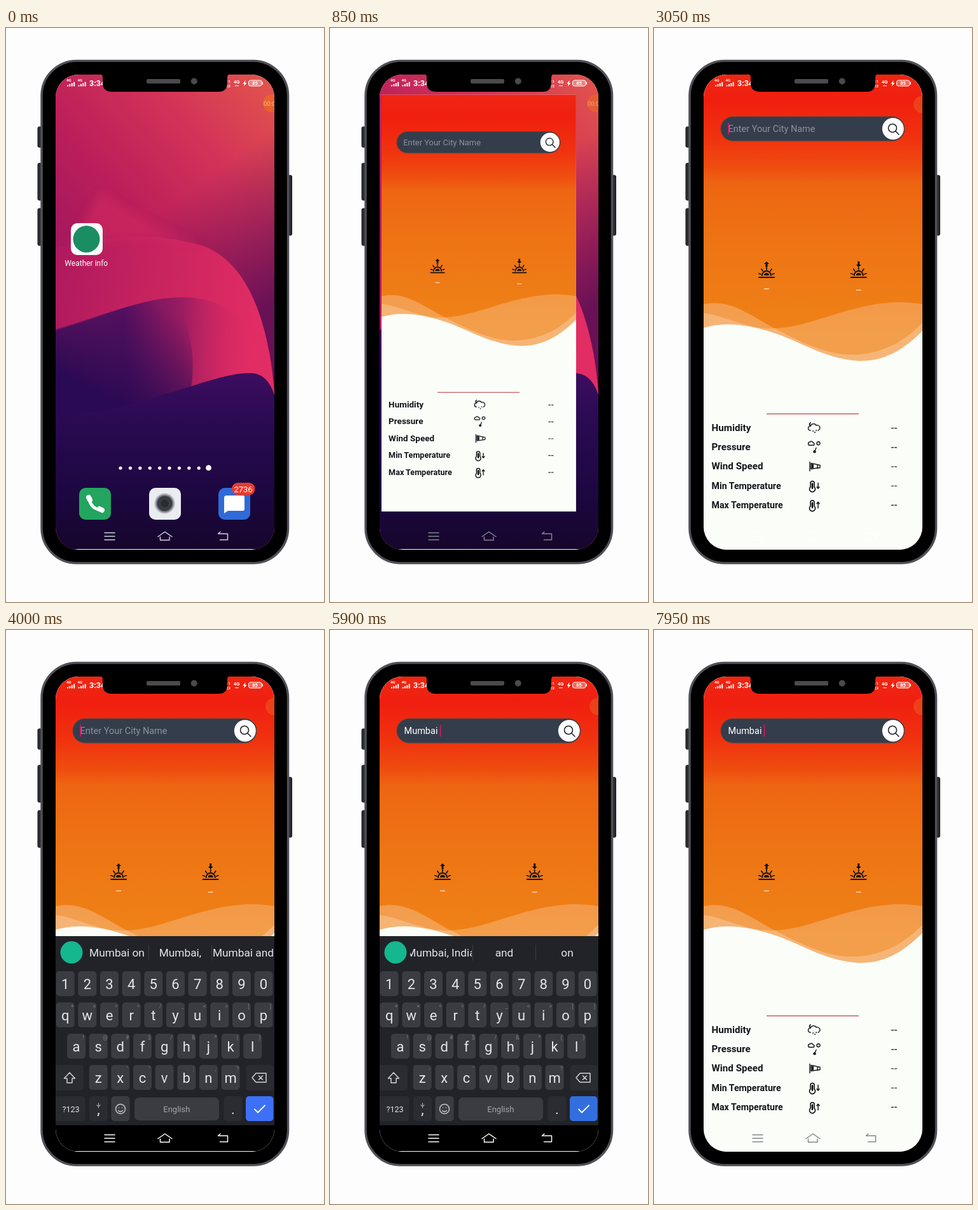
Write an HTML page that moves like this. It is 500 px wide and 900 px high and loops after 8 s.

```html
<!DOCTYPE html>
<html lang="en">
<head>
<meta charset="utf-8">
<title>Weather app demo</title>
<style>
  html, body { margin: 0; width: 100%; height: 100%; overflow: hidden; background: #fdfdfd; }
  svg { display: block; width: 500px; height: 900px; font-family: Roboto, sans-serif; }
  .mid { text-anchor: middle; }
  .line { fill: none; stroke: currentColor; stroke-linecap: round; stroke-linejoin: round; }
</style>
</head>
<body>
<svg viewBox="0 0 500 900">
  <defs>
    <clipPath id="screen"><rect x="78" y="73" width="344" height="745" rx="36"/></clipPath>
    <clipPath id="firstWord"><rect x="126" y="485" width="97" height="40"/></clipPath>
    <filter id="soft"><feGaussianBlur stdDeviation="7"/></filter>
    <g id="sunIcon">
      <path d="M-12 12H12M-7 9a7 7 0 0 1 14 0" class="line" stroke-width="2"/>
      <path d="M-12 6l3 1M12 6l-3 1M-8 -1l2 3M8 -1l-2 3M0 -3v3" class="line" stroke-width="1.8"/>
      <path d="M-4 9a4 4 0 0 1 8 0z"/>
    </g>
    <g id="thermo" class="line" stroke-width="1.5">
      <path d="M-6 -4a3 3 0 0 1 6 0v6a4.5 4.5 0 1 1 -6 0z"/>
      <path d="M-3 -3v7" stroke-width="2.6"/>
    </g>
  </defs>

  <g fill="#2b2c2f" stroke="#17181a" stroke-width="1">
    <rect x="50" y="155" width="8" height="32" rx="2"/>
    <rect x="50" y="212" width="8" height="58" rx="2"/>
    <rect x="50" y="283" width="8" height="58" rx="2"/>
    <rect x="441" y="231" width="8.5" height="94" rx="2"/>
  </g>
  <rect x="56" y="51.5" width="387.5" height="787.5" rx="55" fill="#000" stroke="#505156" stroke-width="3.5"/>

  <g clip-path="url(#screen)">
    <rect x="78" y="73" width="344" height="745" fill="#fbfdf9"/>
    <g id="wallpaper"></g>
    <g id="home"></g>
    <g id="app"></g>
    <g id="recorder">
      <circle cx="418" cy="118" r="14" fill="#e8622d"/>
      <text x="405" y="122" font-size="9.5" fill="#f6bd9d">00:0</text>
    </g>
    <g id="faintRecorder">
      <circle cx="421.500" cy="120" r="13.500" fill="#ee5a20" opacity=".55"/>
      <path d="M415 120h7" stroke="#d9441c" stroke-width="2"/>
    </g>
    <g id="keyboard"></g>
    <g id="nav" class="line" stroke-width="1.5">
      <path d="M155 791.500h16M155 797h16M155 802.500h16"/>
      <path d="M239 797.500L249.800 790L261 797.500M242.500 798v5H257v-5"/>
      <path d="M337 790l-3.500 3h15v9.500h-12"/>
    </g>
    <g id="status" fill="#fff"></g>
  </g>

  <path d="M150 70H350V73Q348 74 348 78V86Q348 100 334 100H167Q152 100 152 86V78Q152 74 150 73z"/>
  <rect x="221" y="80" width="53" height="7" rx="2" fill="#4b4b4e"/>
  <circle cx="295.700" cy="83.500" r="5" fill="#4b4b4e"/>
</svg>

<script>
const $ = id => document.getElementById(id);
const fill = (id, ...parts) => { $(id).innerHTML = parts.flat().join(''); };
const text = (x, y, size, str, color = '#fff', more = '') =>
  `<text x="${x}" y="${y}" font-size="${size}" fill="${color}" ${more}>${str}</text>`;
const mid = (x, y, size, str, color, more = '') => text(x, y, size, str, color, `class="mid" ${more}`);
const box = (x, y, w, h, r, color, more = '') =>
  `<rect x="${x}" y="${y}" width="${w}" height="${h}" rx="${r}" fill="${color}" ${more}/>`;
const shape = (d, color, more = '') => `<path d="${d}" fill="${color}" ${more}/>`;
const dot = (x, y, r, color, more = '') => `<circle cx="${x}" cy="${y}" r="${r}" fill="${color}" ${more}/>`;
const line = (d, color, width) => `<path d="${d}" class="line" color="${color}" stroke-width="${width}"/>`;
const gradient = (id, x1, y1, x2, y2, ...stops) =>
  `<linearGradient id="${id}" gradientUnits="userSpaceOnUse" x1="${x1}" y1="${y1}" x2="${x2}" y2="${y2}">` +
  stops.map(([at, color, alpha = 1]) => `<stop offset="${at}" stop-color="${color}" stop-opacity="${alpha}"/>`).join('') +
  '</linearGradient>';

fill('wallpaper',
  gradient('sky', 420, 90, 120, 350, [0, '#e2534c'], [.35, '#d23458'], [.72, '#bd1f5a'], [1, '#a8195d']),
  gradient('shade', 280, 260, 410, 440, [0, '#6a1058', 0], [1, '#5e0f55', .9]),
  gradient('fold', 78, 400, 400, 440, [0, '#b01a5e'], [.5, '#c9245f'], [1, '#e22c64']),
  gradient('valley', 78, 0, 385, 0, [0, '#7c1766'], [.35, '#5c1162'], [.65, '#951b61', .9], [1, '#e22c64', 0]),
  gradient('dusk', 270, 450, 190, 600, [0, '#2a0a52', 0], [1, '#2a0a52']),
  gradient('hill', 0, 540, 0, 818, [0, '#3d0d60'], [.3, '#290a50'], [.7, '#1c0740'], [1, '#16062c']),
  box(78, 73, 344, 744, 0, 'url(#sky)'),
  box(78, 73, 344, 744, 0, 'url(#shade)'),
  shape('M78 345C140 335 200 312 305 340C370 360 412 440 422 572V620H78z', 'url(#fold)'),
  shape('M150 255C210 305 260 320 310 342C250 325 190 330 100 340z', '#d42a60', 'opacity=".55" filter="url(#soft)"'),
  shape('M78 472C150 452 200 430 250 424C330 415 385 440 422 560V640H78z', 'url(#valley)'),
  shape('M78 474C150 453 200 431 250 424C290 440 300 520 290 570V640H78z', 'url(#dusk)'),
  shape('M78 610C150 602 200 592 240 577C300 560 350 540 385 541C405 542 415 555 422 575V817H78z', 'url(#hill)'));

fill('home',
  box(102, 306, 50, 50, 10, '#fafafa'), dot(126.5, 331, 21, '#1b8d63'),
  mid(126.3, 372.5, 12, 'Weather info'),
  Array.from({ length: 9 }, (_, i) => dot(180 + i * 15.4, 690, 2.6, '#fff')), dot(318.5, 689.7, 4.4, '#fff'),
  box(115, 721, 50, 50, 10, '#23a55f'),
  line('M131 738Q133 753 149 756', '#fff', 5), line('M130 736l2 4M147 754l4 2', '#fff', 8),
  box(225, 721, 50, 50, 10, '#e9edf2'), dot(249.5, 745.5, 16, '#b8bcc2'),
  dot(249.5, 745.5, 14, '#7c8087'), dot(249.5, 745.5, 12, '#3a3d42'), dot(249.5, 745.5, 6, '#2a2c30'),
  box(334, 721, 50, 50, 10, '#2f6bd8'),
  shape('M347 733H372Q375 733 375 736V754Q375 757 372 757H349L343 761V737Q343 733 347 733z', '#fff'),
  box(355, 713, 36.5, 19.5, 9.7, '#ea3a2c'), mid(373, 727.5, 13, '2736'));

const rows = ['Humidity', 'Pressure', 'Wind Speed', 'Min Temperature', 'Max Temperature'];
const cloud = 'M-6 4a3.500 3.500 0 0 1 0 -7a5 5 0 0 1 9 -1a4 4 0 0 1 3 8';
const rowIcons = [
  line(cloud, '#15171b', 1.5) + line('M-6 -3q-3 -3 0 -5M-2 5h.1M3 4h.1M1 7h.1', '#15171b', 1.8),
  line('M-7 -3a2.500 2.500 0 0 1 0 -5a3 3 0 0 1 5 1a2 2 0 0 1 0 4z', '#15171b', 1.4) +
    line('M9 -6a2.500 2.500 0 1 1 -5 0a2.500 2.500 0 0 1 5 0M3 1l-2 5', '#15171b', 1.4) + dot(.5, 7, 2.2, '#15171b'),
  line('M-7 -7V7M-5 -5L9 -2V2L-5 4zM5 -2v4', '#15171b', 1.5) + shape('M-4 -4L-1 -3.500V2.500L-4 3z', '#15171b'),
  '<use href="#thermo"/>' + line('M6 -4v8M4 2l2 2.500l2 -2.500', '#15171b', 1.5),
  '<use href="#thermo"/>' + line('M6 5v-8M4 -2l2 -2.500l2 2.500', '#15171b', 1.5)];
const sun = (x, arrow, dashY) =>
  `<g transform="translate(${x} 379)" fill="#1c120c" color="#1c120c"><use href="#sunIcon"/>${shape(arrow, '#120c08')}</g>` +
  line(`M${x - 3.5} ${dashY}h7`, '#f8d8b5', 1.3);

fill('app',
  gradient('heat', 0, 73, 0, 480, [0, '#ef2612'], [.1, '#f01f10'], [.25, '#f0330f'], [.36, '#ef4e10'],
    [.42, '#ee6512'], [.65, '#ee7414'], [1, '#ef8217']),
  box(78, 73, 344, 745, 0, '#fbfdf9'),
  box(78, 73, 344, 455, 0, 'url(#heat)'),
  shape('M78 433C120 424 150 450 190 471C250 503 290 517 330 511C370 505 397 488 422 462V530H78z', '#fff', 'opacity=".24"'),
  shape('M78 447C110 450 150 474 190 471C250 468 310 431 385 430Q405 430 422 433V530H78z', '#fff', 'opacity=".22"'),
  shape('M78 470C112 460 150 464 200 482C245 500 275 519 322 522C365 523 395 502 422 475V560H78z', '#fbfdf9'),
  box(105, 139, 289, 38, 19, '#343d4b', 'stroke="#59443f" stroke-width="1"'),
  dot(375.8, 158, 17, '#fff'),
  line('M381.500 157a6.500 6.500 0 1 1 -13 0a6.500 6.500 0 0 1 13 0M380 162l5 5', '#20242c', 1.6),
  '<text id="city" x="116.5" y="163.2" font-size="14.5"></text>',
  '<rect id="cursor" y="148.5" width="1.7" height="18.500" fill="#d9136a"/>',
  sun(177, 'M0 -13l4 4H1.500v5h-3v-5H-4z', 409),
  sun(321.7, 'M0 -4l4 -4H1.500v-5h-3v5H-4z', 411),
  line('M177.500 605H321.500', '#c95f62', 1.4),
  rows.map((name, i) => {
    const y = 627 + i * 30.2;
    return text(90.5, y + 5, i < 3 ? 15.2 : 14.2, name, '#14161a', 'font-weight="700"') +
      `<g transform="translate(252 ${y})">${rowIcons[i]}</g>` +
      line(`M373.500 ${y + .5}h3M378.500 ${y + .5}h3`, '#33363b', 1.4);
  }));

const keyX = i => 93.2 + i * 34.65;
const KEY = '#3b3c42', DARK = '#2b2c32', INK = '#e4e5ea', HINT = '#797a82';
const keyRow = (letters, hints, first, y) => [...letters].map((letter, i) => {
  const x = keyX(i + first);
  return box(x - 14.5, y, 29, 39, 5, KEY, `data-key="${letter}"`) + mid(x, y + 27.5, 22, letter, INK) +
    (hints[i] ? mid(x + 11, y + 9, 9, hints[i], HINT) : '');
});
fill('keyboard',
  box(78, 480, 344, 297, 0, '#222328'), box(78, 776.5, 344, 40.5, 0, '#000'),
  dot(103, 505.5, 17.5, '#15b78f'),
  line('M224.500 494v24M323.500 494v24', '#3b3c42', 1),
  '<g id="words"></g>',
  keyRow('1234567890', [], 0, 535),
  keyRow('qwertyuiop', ['+', '×', '÷', '=', '/', '_', '&lt;', '&gt;', '[', ']'], 0, 584),
  keyRow('asdfghjkl', ['!', '@', '#', '$', '/', '&amp;', '*', '(', ')'], .5, 633),
  box(76, 682, 46, 40, 5, DARK), line('M100 694l8.500 9h-4.500v7h-8v-7h-4.500z', '#d2d3d8', 1.5),
  keyRow('zxcvbnm', ['-', "'", '"', ':', ';', ',', '?'], 1.5, 682),
  box(377.5, 682, 43, 40, 5, DARK),
  line('M393 695h16v14h-16l-6 -7zM397.500 699l6 6M403.500 699l-6 6', '#d2d3d8', 1.5),
  box(76, 731, 48.5, 39, 5, DARK), mid(102, 755.5, 12.5, '?123', INK),
  box(131, 731, 29, 39, 5, DARK), mid(145.5, 759, 22, ',', INK),
  line('M145.500 742v3M143 745q2.500 3 5 0M145.500 747v2', '#a0a1a8', 1.3),
  box(165.5, 731, 29, 39, 5, KEY),
  line('M187.500 751a7.500 7.500 0 1 1 -15 0a7.500 7.500 0 0 1 15 0M176.500 753.500q3.500 3.500 7 0M177.500 749h.1M182.500 749h.1', '#c6c7cd', 1.5),
  box(202, 733, 133, 36, 7, KEY, 'data-key=" "'), mid(268.3, 756, 13, 'English', '#a4a5ac'),
  box(342.5, 731, 29, 39, 5, DARK), mid(357, 759, 22, '.', INK),
  box(377, 731, 43.5, 39, 5, '#3d70f6', 'id="enter"'), line('M391 751.500l5 5l11 -11', '#fff', 1.8));

const bars = x => [0, 1, 2, 3].map(i => box(x + i * 3.4, 89.5 - i * 1.6, 2, 2 + i * 1.6, 0, '#fff'));
fill('status',
  bars(96), bars(113.5),
  text(95, 83.5, 6, '4G', '#fff', 'font-weight="700"'), text(112.5, 83.5, 6, '4G', '#fff', 'font-weight="700"'),
  text(131, 91, 12.5, '3:34', '#fff', 'font-weight="700"'),
  text(346, 86, 6, '11', '#fff', 'font-weight="700"'), text(346, 92.5, 6, 'E2', '#fff', 'font-weight="700"'),
  text(358, 87, 7.5, '4G', '#fff', 'font-weight="700"'), line('M361 90.500h1M364 90.500h1', '#fff', 1.6),
  shape('M376.500 82l-4 5.500h2.500l-1 4l4.500 -5.500h-2.500z', '#fff'),
  '<rect x="381.500" y="82" width="20.5" height="9" rx="3" fill="#fff" fill-opacity=".3" stroke="#fff"/>',
  box(402.5, 84.5, 1.5, 4, 0, '#fff'), mid(391.5, 89.3, 7.5, '85', '#fff', 'font-weight="700"'));

// Each track is a list of [time, value] steps.
const LOOP = 8000, STEP = 50;
const zoom = [[600, .14], [700, .46], [800, .78], [850, .877], [900, .95], [1000, 1]];
const homeFade = [[600, 1], [750, 0]];
const recorderFade = [[1500, 1], [1800, 0]];
const keyboardDrop = [[3100, 340], [3200, 110], [3300, 20], [3350, 0], [6050, 0], [6150, 120], [6250, 340]];
const navColor = [[0, '#d6d0dc'], [700, '#85858b'], [2950, '#fff'], [6250, '#85858b']];
const typing = [[4350, 'M'], [4600, 'u'], [4850, 'm'], [5050, 'b'], [5250, 'a'], [5450, 'i'], [5650, ' ']];
const FOCUS = 2950;

function ramp(track, t) {
  const i = track.findIndex(([at]) => at > t);
  if (i < 0) return track[track.length - 1][1];
  if (i === 0) return track[0][1];
  const [t0, a] = track[i - 1], [t1, b] = track[i];
  return a + (b - a) * (t - t0) / (t1 - t0);
}
const passed = (track, t) => track.filter(([at]) => at <= t);

let shownWords;
function showWords(words) {
  if (words === shownWords) return;
  shownWords = words;
  const [left, center, right] = words.split('|');
  fill('words', `<g clip-path="url(#firstWord)">${mid(174.5, 512, 17.3, left, INK)}</g>`,
    mid(274, 512, 17.3, center, INK), mid(373, 512, 17.3, right, INK));
}

const keys = [...document.querySelectorAll('[data-key]')];
const show = (id, on) => $(id).setAttribute('visibility', on ? 'visible' : 'hidden');

function draw(t) {
  const s = ramp(zoom, t), sx = 1 - (1 - s) * .9;
  show('app', t >= 600);
  $('app').setAttribute('transform', `translate(105 331) scale(${sx} ${s}) translate(-105 -331)`);
  $('home').setAttribute('opacity', ramp(homeFade, t));

  const fade = ramp(recorderFade, t);
  $('recorder').setAttribute('opacity', fade * (t < 700 ? 1 : .75));
  $('faintRecorder').setAttribute('opacity', 1 - fade);

  const drop = ramp(keyboardDrop, t);
  show('keyboard', drop < 340);
  $('keyboard').setAttribute('transform', `translate(0 ${drop})`);
  $('nav').setAttribute('color', passed(navColor, t).pop()[1]);

  const typed = passed(typing, t);
  const last = typed.length ? typed[typed.length - 1] : [FOCUS, ''];
  const city = $('city');
  city.textContent = typed.map(([, c]) => c).join('').trim() || 'Enter Your City Name';
  city.setAttribute('fill', typed.length ? '#fff' : '#8d929a');
  const end = typed.length ? 117.5 + city.getComputedTextLength() : 116.3;
  $('cursor').setAttribute('x', end + (last[1] === ' ' ? 2.3 : 0));
  show('cursor', t >= FOCUS && (t - last[0]) % 1000 < 500);

  const held = t - last[0] < 100 ? last[1].toLowerCase() : null;
  keys.forEach(key => key.setAttribute('fill', key.dataset.key === held ? '#55565e' : KEY));
  $('enter').setAttribute('fill', t >= 5900 ? '#336edf' : '#3d70f6');
  showWords(last[1] === ' ' ? 'Mumbai, India|and|on' : 'Mumbai on|Mumbai,|Mumbai and');
}

const start = performance.now();
function tick() {
  const t = (performance.now() - start) % LOOP;
  draw(t - t % STEP);
  requestAnimationFrame(tick);
}
tick();
</script>
</body>
</html>
```
